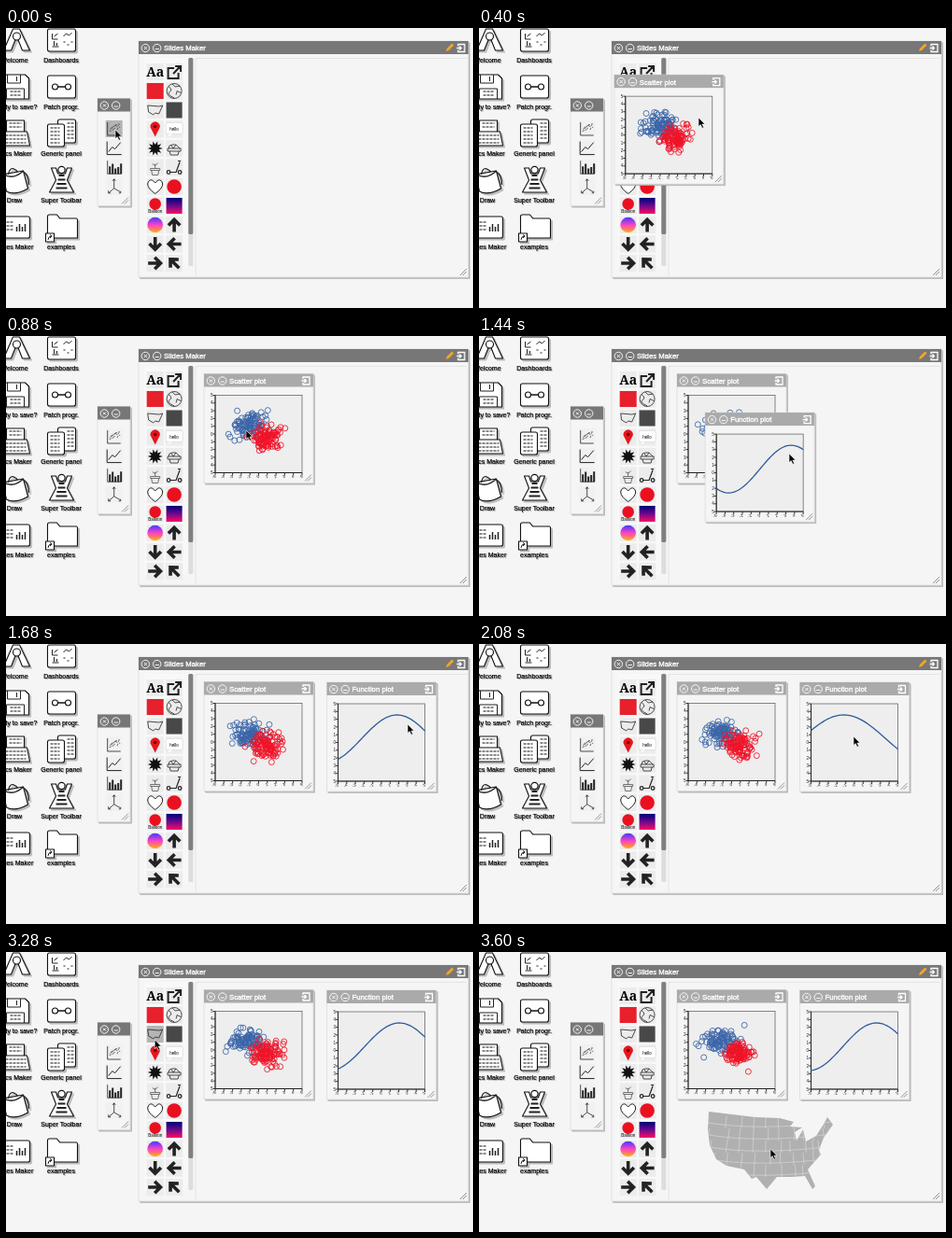
These frames come from a looping animation (500 by 300 pixels, 3680 ms). An HTML page:

```html
<!DOCTYPE html>
<html lang="en">
<head>
<meta charset="utf-8">
<title>Slides Maker desktop</title>
<style>
  html, body { margin: 0; width: 100%; height: 100%; overflow: hidden; background: #f5f5f5; }
  svg { display: block; width: 500px; height: 300px; font-family: "Liberation Sans", Arial, sans-serif; }
  .title { font-size: 7.75px; fill: #fff; stroke: #fff; stroke-width: .35; }
  .label { font-size: 7px; text-anchor: middle; stroke: #000; stroke-width: .2; filter: drop-shadow(1px 1px 0 #aaa); }
  .ticks { font-size: 4.5px; text-anchor: end; fill: #222; }
  .desk { fill: #fff; stroke: #111; stroke-width: 1.1; stroke-linejoin: round; filter: drop-shadow(2px 2px 0 #bbb); }
</style>
</head>
<body>
<svg id="stage" viewBox="0 0 500 300"></svg>
<script>
const LOOP = 3680, STEP = 80;
const SHOW = { scatter: 160, wave: 1120, map: 3440 };
const stage = document.getElementById('stage');
const $ = id => document.getElementById(id);
const range = n => [...Array(n).keys()];
const times = (n, fn) => range(n).map(fn).join('');
const rect = (x, y, w, h, fill, more = '') =>
  `<rect x="${x}" y="${y}" width="${w}" height="${h}" fill="${fill}" ${more}/>`;
const dot = (x, y, r, fill = '#fff') => `<circle cx="${x}" cy="${y}" r="${r}" fill="${fill}"/>`;
const ring = (x, y, r) => `M${x - r} ${y}a${r} ${r} 0 1 0 ${2 * r} 0a${r} ${r} 0 1 0 ${-2 * r} 0`;
const path = (d, more = '') => `<path d="${d}" ${more}/>`;
const line = (d, width = 1, color = '#222', more = '') =>
  path(d, `fill="none" stroke="${color}" stroke-width="${width}" ${more}`);
const text = (x, y, s, more = '') => `<text x="${x}" y="${y}" ${more}>${s}</text>`;
const group = (x, y, body, more = '') => `<g transform="translate(${x} ${y})" ${more}>${body}</g>`;
function randomizer(seed) {
  const next = () => (seed = seed * 16807 % 2147483647) / 2147483647;
  next();
  return next;
}

// ---- windows ----
const buttons = line(ring(7.3, 7.5, 4.2) + 'm2.7-1.6l3.2 3.2m0-3.2l-3.2 3.2' + ring(19.7, 7.5, 4.2) + 'm2.2 1h4.2', .9, '#fff');
const exitIcon = x => line(`M${x - 3} 5.5v-2h7v8h-7v-2m-1.5-2h5m-2-2l2 2-2 2`, 1.3, '#fff');
const frame = (w, h, color, title = '') =>
  rect(2, 2, w, h, '#000', 'opacity=".22"') + rect(1, 1, w + .7, h + .7, '#bbb') +
  rect(0, 0, w, h, '#f5f5f5', 'stroke="#ddd" stroke-width=".8"') + rect(0, 0, w, 14, color) +
  buttons + text(27, 10.4, title, 'class="title"') + line(`M${w - 9} ${h - 2}l7-7m-4 7l4-4`, .9, '#888');

const plotWindow = (id, title, body) => `<g id="${id}">` +
  frame(117, 117, '#aaa', title) + exitIcon(109) +
  rect(12, 23, 93, 83, '#eee', 'stroke="#555" stroke-width=".7"') + line('M12 23v83h93') +
  line(times(11, i => `M9.5 ${23 + i * 8.3}h2.5M${12 + i * 9.3} 106v3`), .9) +
  `<g class="ticks">` + times(11, i => text(9.5, 24.6 + i * 8.3, Math.abs(5 - i)) +
    group(13 + i * 9.3, 111, text(0, 0, i - 5, 'transform="rotate(-25)"'))) + '</g>' + body + '</g>';

// ---- icon palettes ----
const small = 'font-size="4.5" text-anchor="middle"';
const arrow = angle => line('M0 7.5V-5M-6.2.5L0-5.8 6.2.5', 3.6, '#222', `transform="rotate(${angle})"`);
const star = range(20).map(i => {
  const r = i % 2 ? 4.3 : 8, a = i * Math.PI / 10;
  return (r * Math.cos(a)).toFixed(1) + ' ' + (r * Math.sin(a)).toFixed(1);
}).join('L');
const slideIcons = [
  text(0, 5, 'Aa', 'font-family="Noto Serif, serif" font-weight="700" font-size="14" text-anchor="middle"'),
  line('M0-4h-6.5V7h11V1M-1 2L6-5.5M1-6h6V0', 2),
  rect(-9, -8.5, 18, 17, '#e8202c'),
  line(ring(0, 0, 8) + 'M-6-5Q-1-1-5 1T0 7.5M-2-7.5l3 3 5-1M7 2L3 0 2 4', .8),
  line('M-8-5L4-4 8-5 4 4 0 3-2 5-7 2z', .8),
  rect(-8.5, -8.5, 17, 17, '#484848'),
  path('M0 8L-4 0A5 5 0 1 1 4 0Z', 'fill="#e8141c"') + dot(0, -3, 1.8, '#700'),
  rect(-9, -7, 18, 12, '#fff', 'rx="2" stroke="#ccc" stroke-width=".5"') + path('M-6 5v3l4-3', 'fill="#fff"') + text(0, 1, 'hello', small),
  path(`M${star}z`, 'fill="#111"'),
  line('M-7 0H7V3H-7ZM-5 3l1 4H4l1-4M-6 0q0-4 4-4t4 0 4 4M-3-3l2 3 3-4', .8),
  line('M-5 1H5V3H-5ZM-4 3l1 5H3l1-5M0 1V-4M-3-4L0-2l3-3', .8, '#555'),
  line('M-5 5H2L6-6M4-7H7' + ring(-6, 5, 1.8) + ring(6, 5, 1.8), 1.2),
  path('M0 7.5Q-8 2-8-3Q-7-8-3-7L0-4 3-7Q7-8 8-3Q8 2 0 7.5Z', 'fill="#fff" stroke="#222"'),
  dot(0, 0, 7.8, '#ea1020'),
  dot(0, -2, 6.3, '#ea1020') + text(0, 7.6, 'Balloon', small),
  rect(-8.5, -8.5, 17, 17, 'url(#dusk)'),
  dot(0, 0, 8.3, 'url(#sunset)'),
  ...[0, 180, -90, 90, -45].map(arrow)
];
const speckle = randomizer(7);
const plotIcons = [
  line('M-7-7V7H7', .8) + line(times(22, i => `M${-5 + i / 2} ${4 - i / 2 * speckle() - 5 * speckle()}h1`), 1, '#555'),
  line('M-7.5-7V7H8M-6 4l4-5 3 2 6-7'),
  line('M-7-7V7H8', .8) + line(times(5, i => `M${-4.5 + 3 * i} 7v${-8 - 3 * Math.sin(i * 2)}`), 2),
  line('M0-8V2l-6 5M0 2l7 4M-1.5-6L0-8l1.5 2M-6 4.5V7h2.5M5 7h2V5', .8)
];
const cells = [
  ...slideIcons.map((icon, i) => ({ icon, x: 159.7 + i % 2 * 20.4, y: 47 + (i >> 1) * 20.5, fill: '#ececec' })),
  ...plotIcons.map((icon, i) => ({ icon, x: 115.7, y: 108 + i * 20.6, fill: '#f1f1f1' }))
];

// ---- desktop: art is drawn around its own middle ----
const rows = (x, y, w, n) => line(times(n, i => `M${x} ${y + 4 * i}h${w}`), 1, '#111', 'stroke-dasharray="3 1"');
const card = (x, y, w, h) => rect(x, y, w, h, '#fff', 'rx="2"');
const deskIcons = [
  ['Welcome', path('M-12 11L-2-12H5L16 11H8L2-4-4 11Z') + dot(2, -4, 4)],
  ['Dashboards', card(-15, -12, 30, 24) + line('M-10-7v6h6M-8-4l4-3M2-4l3-3 3 2 3-3M-10 7h7M-8 6v-5m3 5v-3M2 2h2m2 3h2m2-3h2')],
  ['Ready to save?', path('M-13-13H11L15-9V13H-13Z') + line('M-8-13v9H6v-9M2-11v5M-9 13V2H10v11') + rows(-5, 5, 11, 2)],
  ['Patch progr.', card(-15, -12, 30, 24) + line('M-6 0H6', 1.6) + dot(-7, 0, 3) + dot(7, 0, 3)],
  ['Docs Maker', rect(-9, -14, 19, 14, '#fff') + path('M-13-2H13L16 13H-14Z') + rows(-6, -11, 13, 2) + rows(-10, 2, 22, 3)],
  ['Generic panel', card(-4, -15, 19, 25) + card(-15, -10, 18, 24) + rows(-12, -6, 10, 5) + rows(6, -11, 7, 5)],
  ['Draw', path('M-13-6L9-10 14 9Q0 17-9 12Z') + line('M-12-6Q-1 0 9-10M-7-6Q-5-17 3-9M9-9q6 3 6 14', 1.3)],
  ['Super Toolbar', path('M-11-13h5l2 6h8l2-6h5L6 0 13 13H-13L-6 0Z') + dot(0, -11, 3.6) +
    line(times(4, i => `M${-3 - i} ${-5 + 4.5 * i}h${6 + 2 * i}`), 2)],
  ['Slides Maker', card(-17, -11, 33, 23) + rows(-9, -5, 8, 3) + line(times(4, i => `M${2 + 3 * i} 5v${-5 - 3 * (i % 2)}`), 1.5)],
  ['examples', path('M-15-11q0-2 2-2h8l3 4h18q1 0 1 2V12H-15Z') + rect(-17, 7, 9, 9, '#fff') +
    line('M-14.5 14q0-4 4-4m-2-1.5l2.2 1.5-2.2 2')]
];

// ---- map: a few coast points, state lines on a staggered grid ----
const coast = 'M246 171L296 177 322 178 337 182 333 187 346 188 338 193 340 202 347 190 350 203 361 197 368 186 ' +
  '373 177 379 185 369 199 364 212 366 217 352 233 360 251 357 254 349 240 335 241 319 241 308 254 ' +
  '297 241 292 243 284 233 265 229 254 222 247 207 245 190Z';
const jitter = randomizer(23);
const stateLines = times(5, r => {
  const y = 185 + r * 13;
  return `M240 ${y - 3}Q300 ${y + 8} 385 ${y - 4}` +
    times(11, i => `M${246 + 17 * i - .45 * i * i + 7 * jitter()} ${y - 9}l${(5 - i) * -.4} 13`);
});

// ---- scene ----
const gradient = (id, colors) => `<linearGradient id="${id}" x2="0" y2="1">` +
  colors.map((c, i) => `<stop offset="${i / (colors.length - 1)}" stop-color="${c}"/>`).join('') + '</linearGradient>';
stage.innerHTML = '<defs>' + gradient('dusk', ['#000078', '#6a0a8c', '#ff0a64']) +
  gradient('sunset', ['#3c3cff', '#ff40c8', '#ffb400']) + `<clipPath id="land">${path(coast)}</clipPath></defs>` +
  deskIcons.map(([name, art], i) => group(9.5 + i % 2 * 50, 13 + (i >> 1) * 50,
    `<g class="desk">${art}</g>` + text(-.5, 23.5, name, 'class="label"'))).join('') +
  group(98, 75.5, frame(35, 115, '#777')) +
  group(142, 14, frame(353, 253, '#777', 'Slides Maker') + exitIcon(345) +
    path('M329 11l1-3 5.5-5.5 2 2L332 10Z', 'fill="#f5a623"') + rect(6, 18, 47, 224, '#f8f8f8') +
    rect(53.3, 18, 5, 223, '#ddd', 'rx="1.5"') + rect(53.3, 18, 5, 189, '#808080', 'rx="1.5"') +
    line('M61 251V18.5H351', 1, '#e4e4e4')) +
  cells.map((c, i) => group(c.x, c.y, rect(-9, -9, 18, 18, c.fill, `id="cell${i}"`) + c.icon)).join('') +
  plotWindow('scatter', 'Scatter plot', line('', .85, '#3a65a8', 'id="blue"') + line('', .85, '#f01428', 'id="red"')) +
  plotWindow('wave', 'Function plot', line('', 1.3, '#2f5a9c', 'id="curve"')) +
  `<g id="map">${path(coast, 'fill="#b0b0b0"')}${line(stateLines, .6, '#dcdcdc', 'clip-path="url(#land)"')}</g>` +
  path('M0 0v9.6l2.2-2 1.7 3.7 1.7-.8-1.7-3.5h3.1z', 'id="cursor" stroke="#fff" stroke-width=".6"');

// ---- motion ----
// Stops of the pointer: [time, x, y]
const pointerStops = [[0, 117, 109], [160, 150, 116], [400, 235, 96], [560, 303, 87], [880, 257, 101], [1120, 115, 126],
  [1440, 332, 126], [1680, 430, 86], [2080, 401, 99], [2720, 154, 143], [3360, 160, 87], [3600, 312, 211]];
// Peak of the curve: [time, x]
const peakStops = [[1440, 80], [2080, 35], [2720, 58], [3600, 70]];

function at(stops, t) {
  const i = stops.findIndex(s => s[0] > t);
  if (i < 1) return stops.at(i).slice(1);
  const a = stops[i - 1], b = stops[i], f = (t - a[0]) / (b[0] - a[0]);
  return a.slice(1).map((v, j) => v + (b[j + 1] - v) * f);
}
// Pulls a new window from the small palette to its dock, bending the way with one power per axis.
function drag(t, start, duration, dockX, dockY, powX, powY) {
  const p = Math.min(1, Math.max(0, (t - start) / duration));
  return [107 + (dockX - 107) * p ** powX, 102 + (dockY - 102) * p ** powY];
}
function place(id, [x, y], visible = true) {
  $(id).setAttribute('transform', `translate(${x} ${y})`);
  $(id).style.display = visible ? '' : 'none';
}
function cloud(seed, cx, cy, sx, sy) {
  const random = randomizer(seed);
  const spread = s => (random() + random() + random() + random() - 2) * s * 1.73;
  return times(100, () => ring(cx + spread(sx), cy + spread(sy), 3));
}
function curve(peak) {
  const k = .032 + .015 * (peak / 80) ** 2;
  return 'M' + range(48).map(i => {
    const x = i * 93 / 47;
    return `${12 + x} ${60.5 - 25.5 * Math.cos((x - peak) * k)}`;
  }).join('L');
}

let shown = -1;
function draw(now) {
  requestAnimationFrame(draw);
  const t = Math.floor(now % LOOP / STEP) * STEP;
  if (t === shown) return;
  shown = t;

  const [x, y] = at(pointerStops, t);
  place('cursor', [x, y]);
  place('scatter', drag(t, SHOW.scatter, 400, 212, 40.5, 2, 1 / 3), t >= SHOW.scatter);
  place('wave', drag(t, SHOW.wave, 560, 343.5, 41, 1, 2), t >= SHOW.wave);
  place('map', [x - 312, y - 211], t >= SHOW.map);
  cells.forEach((c, i) => {
    const over = Math.max(Math.abs(x + 1 - c.x), Math.abs(y + 1 - c.y)) < 9;
    $('cell' + i).setAttribute('fill', over ? '#b4b4b4' : c.fill);
  });
  $('blue').setAttribute('d', cloud(t * 31 + 977, 48, 55, 9.5, 6.5));
  $('red').setAttribute('d', cloud(t * 57 + 4231, 67, 68, 8, 6.5));
  $('curve').setAttribute('d', curve(at(peakStops, t)[0]));
}
requestAnimationFrame(draw);
</script>
</body>
</html>
```
